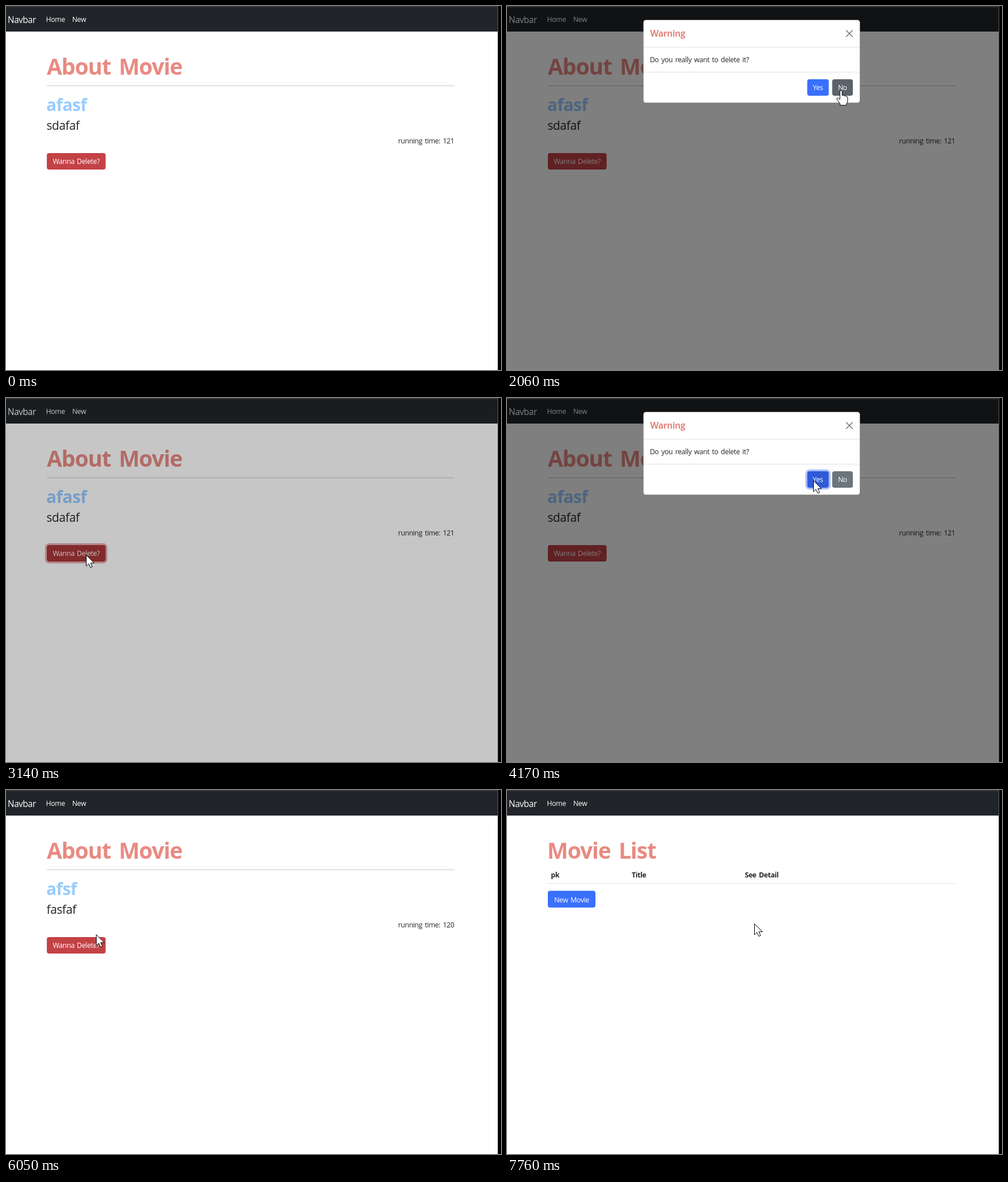
Animation of 873x641 px, one loop 7.82 s. Source, as an HTML page:

```html
<!DOCTYPE html>
<html lang="en">
<head>
<meta charset="utf-8">
<title>Movie delete dialog</title>
<style>
  html, body { margin: 0; width: 100%; height: 100%; overflow: hidden; background: #fff; }
  svg { display: block; width: 873px; height: 641px; }
  text {
    font: 12.3px "Open Sans", "Noto Sans", sans-serif;
    letter-spacing: -.028em;
    word-spacing: .13em;
    fill: #212529;
    white-space: pre;
  }
  .light { fill: #fff; }
  .brand { font-size: 15.4px; }
  .h1 { font-size: 39px; font-weight: 700; fill: #e88a82; }
  .h2 { font-size: 30px; font-weight: 700; fill: #99ccff; letter-spacing: -.02em; }
  .h3 { font-size: 21px; letter-spacing: -.02em; }
  .h5 { font-size: 15.4px; font-weight: 700; fill: #e0877f; }
  .bold { font-weight: 700; }
  .link { fill: #3a70fe; text-decoration: underline; }
  .end { text-anchor: end; }
  .mid { text-anchor: middle; }
</style>
</head>
<body>
<svg viewBox="0 0 873 641">
  <rect width="873" height="641" fill="#fff"/>
  <rect width="873" height="45" fill="#212529"/>
  <text class="light brand" x="3" y="29.5">Navbar</text>
  <text class="light" x="70.5" y="28">Home</text>
  <text class="light" x="116.7" y="28">New</text>

  <g id="detail">
    <text class="h1" x="72" y="121">About Movie</text>
    <rect x="72" y="140" width="719" height="1" fill="#c8c9ca"/>
    <text class="h2" id="name" x="71" y="185"></text>
    <text class="h3" id="plot" x="71.5" y="218"></text>
    <text class="end" id="runtime" x="790.5" y="241.5"></text>
    <g id="del">
      <rect class="ring" x="70.4" y="257.4" width="106.8" height="32.2" rx="5.5" fill="none" stroke="#cc5e62" stroke-opacity=".5" stroke-width="3.2"/>
      <rect class="face" x="72" y="259" width="103.7" height="29" rx="4"/>
      <text class="light mid" x="123.8" y="278">Wanna Delete?</text>
    </g>
  </g>

  <g id="list">
    <text class="h1" x="71" y="121">Movie List</text>
    <text class="bold" x="77.5" y="154">pk</text>
    <text class="bold" x="220" y="154">Title</text>
    <text class="bold" x="419.5" y="154">See Detail</text>
    <rect x="72" y="164" width="719" height="1" fill="#dee2e6"/>
    <g id="row">
      <text class="bold" x="77.5" y="186">2</text>
      <text x="220" y="186">afsf</text>
      <text class="link" x="419.5" y="186">Detail</text>
      <rect x="72" y="196" width="719" height="1" fill="#dee2e6"/>
    </g>
    <g id="add">
      <rect x="72" y="177.5" width="84" height="29.5" rx="4" fill="#3a70fe"/>
      <text class="light mid" x="114" y="197.5">New Movie</text>
    </g>
  </g>

  <rect id="backdrop" width="873" height="641"/>

  <g id="modal">
    <rect x="240.5" y="24.5" width="382" height="146" rx="4.5" fill="#fff" stroke="#000" stroke-opacity=".2"/>
    <text class="h5" x="252.5" y="54">Warning</text>
    <path d="M598.3 43l11 11m0 -11l-11 11" stroke="#757575" stroke-width="1.5" stroke-linecap="round"/>
    <path d="M241 72.5H622M241 116.5H622" stroke="#dee2e6"/>
    <text x="252" y="99">Do you really want to delete it?</text>
    <g id="yes">
      <rect class="ring" x="527.9" y="127.4" width="41.2" height="32.2" rx="5.5" fill="none" stroke="#5882ff" stroke-opacity=".5" stroke-width="3.2"/>
      <rect class="face" x="529.5" y="129" width="38" height="29" rx="4"/>
      <text class="light mid" x="548.3" y="148">Yes</text>
    </g>
    <g id="no">
      <rect class="ring" x="571.9" y="127.4" width="39.7" height="32.2" rx="5.5" fill="none" stroke="#828a91" stroke-opacity=".5" stroke-width="3.2"/>
      <rect class="face" x="573.5" y="129" width="36.5" height="29" rx="4"/>
      <text class="light mid" x="591.7" y="148">No</text>
    </g>
  </g>

  <rect width="873" height="2" fill="#35383c"/>
  <rect x="867" width="1" height="641" fill="#606060"/>
  <rect x="868" width="5" height="641" fill="#000"/>

  <g id="pointer" fill="#fff" stroke="#000" stroke-linejoin="round">
    <path id="arrow" d="M.5 .5V20L4.8 15.8L8 22.7L11.2 21.2L8.1 14.7H14.6Z"/>
    <path id="hand" d="M-1.9 1.6Q-1.9 -.2 .1 -.2Q2.1 -.2 2.1 1.6V8.4Q4.8 7.3 5.7 9.2Q8.4 8.4 9 10.4Q11.8 9.9 11.8 12.8V18Q11.8 21 9.5 23.2V25.8H-1.6V23.4L-7 15.6Q-8.2 13.4 -6.4 12.8Q-4.9 12.5 -1.9 15.6Z"/>
  </g>
</svg>

<script>
  const LOOP = 7820;
  const FADE = 150, SLIDE = 300, LIFT = 40;

  // Pointer track: time, x, y
  const track = [
    [70, 800, 641], [300, 520, 330], [560, 230, 221], [800, 140, 268], [1250, 140, 268],
    [1700, 560, 163], [1900, 589, 149], [2230, 589, 149], [2480, 420, 220], [2800, 150, 270],
    [2950, 141, 276], [3300, 141, 276], [3520, 373, 213], [3640, 450, 196], [3850, 540, 145],
    [4400, 540, 145], [4900, 440, 180], [5480, 440, 180], [5850, 240, 232], [6050, 159, 254],
    [6200, 135, 269], [6600, 135, 269], [6850, 475, 214], [7080, 521, 143], [7200, 545, 144],
    [7460, 545, 144], [7740, 436, 235], [LOOP, 436, 235]
  ];

  // Dialog runs: opening, button press, closing (null when a page load ends it), end
  const dialogs = [
    { open: 1010, press: 2090, close: 2120, end: 2570, choice: "no" },
    { open: 3074, press: 4130, close: null, end: 4340, choice: "yes" },
    { open: 6370, press: 7290, close: null, end: 7480, choice: "yes" }
  ];

  // Page loads: start, view, texts
  const pages = [
    { at: 0, view: "detail", name: "afasf", plot: "sdafaf", runtime: 121 },
    { at: 4340, view: "list", row: true },
    { at: 5380, view: "detail", name: "afsf", plot: "fasfaf", runtime: 120 },
    { at: 7480, view: "list", row: false }
  ];

  const el = {};
  document.querySelectorAll("[id]").forEach(node => el[node.id] = node);

  const clamp = k => Math.max(0, Math.min(1, k));
  const easeOut = k => 1 - (1 - clamp(k)) ** 2.2;
  const show = (node, on) => node.setAttribute("display", on ? "inline" : "none");
  const inside = (p, x, y, w, h) => p.x >= x && p.x <= x + w && p.y >= y && p.y <= y + h;

  // Monotone cubic through the track, so rests stay still
  function along(t, axis) {
    let i = 0;
    while (i < track.length - 2 && t >= track[i + 1][0]) i++;
    const slope = j => j < 0 || j > track.length - 2 ? 0 :
      (track[j + 1][axis] - track[j][axis]) / (track[j + 1][0] - track[j][0]);
    const tangent = j => {
      const a = slope(j - 1), b = slope(j);
      return a * b > 0 ? 2 * a * b / (a + b) : 0;
    };
    const span = track[i + 1][0] - track[i][0];
    const k = clamp((t - track[i][0]) / span), r = 1 - k;
    return track[i][axis] * r * r * (1 + 2 * k) + track[i + 1][axis] * k * k * (3 - 2 * k)
      + span * k * r * (tangent(i) * r - tangent(i + 1) * k);
  }

  function paintButton(node, fill, ring) {
    node.querySelector(".face").setAttribute("fill", fill);
    show(node.querySelector(".ring"), ring);
  }

  function drawPage(t) {
    const page = pages.filter(p => t >= p.at).pop();
    const detail = page.view === "detail";
    show(el.detail, detail);
    show(el.list, !detail);
    if (detail) {
      el.name.textContent = page.name;
      el.plot.textContent = page.plot;
      el.runtime.textContent = "running time: " + page.runtime;
    } else {
      show(el.row, page.row);
      el.add.setAttribute("transform", `translate(0 ${page.row ? 32 : 0})`);
    }
    return page;
  }

  function drawDialog(t, run) {
    show(el.backdrop, run);
    show(el.modal, run);
    if (!run) return;
    const start = run.open + FADE;
    const closing = run.close !== null && t >= run.close;
    const dim = clamp((t - run.open) / FADE) -
      (closing ? clamp((t - run.close - SLIDE) / FADE) : 0);
    const alpha = closing ? 1 - clamp((t - run.close) / FADE) : clamp((t - start) / FADE);
    const lift = closing ? easeOut((t - run.close) / SLIDE) : 1 - easeOut((t - start) / SLIDE);
    el.backdrop.setAttribute("opacity", dim / 2);
    el.modal.setAttribute("opacity", alpha);
    el.modal.setAttribute("transform", `translate(0 ${-LIFT * lift})`);
  }

  function draw(t) {
    const p = { x: along(t, 1), y: along(t, 2) };
    const page = drawPage(t);
    const run = dialogs.find(d => t >= d.open && t < d.end);
    drawDialog(t, run);

    const ready = run && t >= run.open + FADE + SLIDE && !(run.close && t > run.close);
    const pressed = run && t >= run.press;
    const onYes = ready && inside(p, 529, 129, 39, 29);
    const onNo = ready && inside(p, 573, 129, 37, 29);
    const onDelete = page.view === "detail" && inside(p, 72, 259, 104, 29);
    const onLink = page.row && inside(p, 419, 174, 36, 16);

    const opening = run && t < run.open + FADE + SLIDE;
    const refocused = t >= dialogs[0].end && t < dialogs[1].open;
    const dark = onDelete && (!run || t < run.open + FADE);
    paintButton(el.del, dark ? "#a83638" : "#c44246", opening || refocused);

    const yesDown = pressed && run.choice === "yes";
    const noDown = pressed && run.choice === "no";
    paintButton(el.yes, yesDown ? "#2f5bd7" : onYes ? "#325fd9" : "#3a70fe", yesDown);
    paintButton(el.no, onNo || noDown ? "#5c636a" : "#6c757d", noDown);

    const hand = (onDelete && !run) || ((onYes || onNo) && !yesDown) || onLink;
    show(el.pointer, t >= 70);
    show(el.hand, hand);
    show(el.arrow, !hand);
    el.pointer.setAttribute("transform", `translate(${p.x} ${p.y})`);
  }

  const begin = performance.now();
  function tick() {
    draw((performance.now() - begin) % LOOP);
    requestAnimationFrame(tick);
  }
  tick();
</script>
</body>
</html>
```
